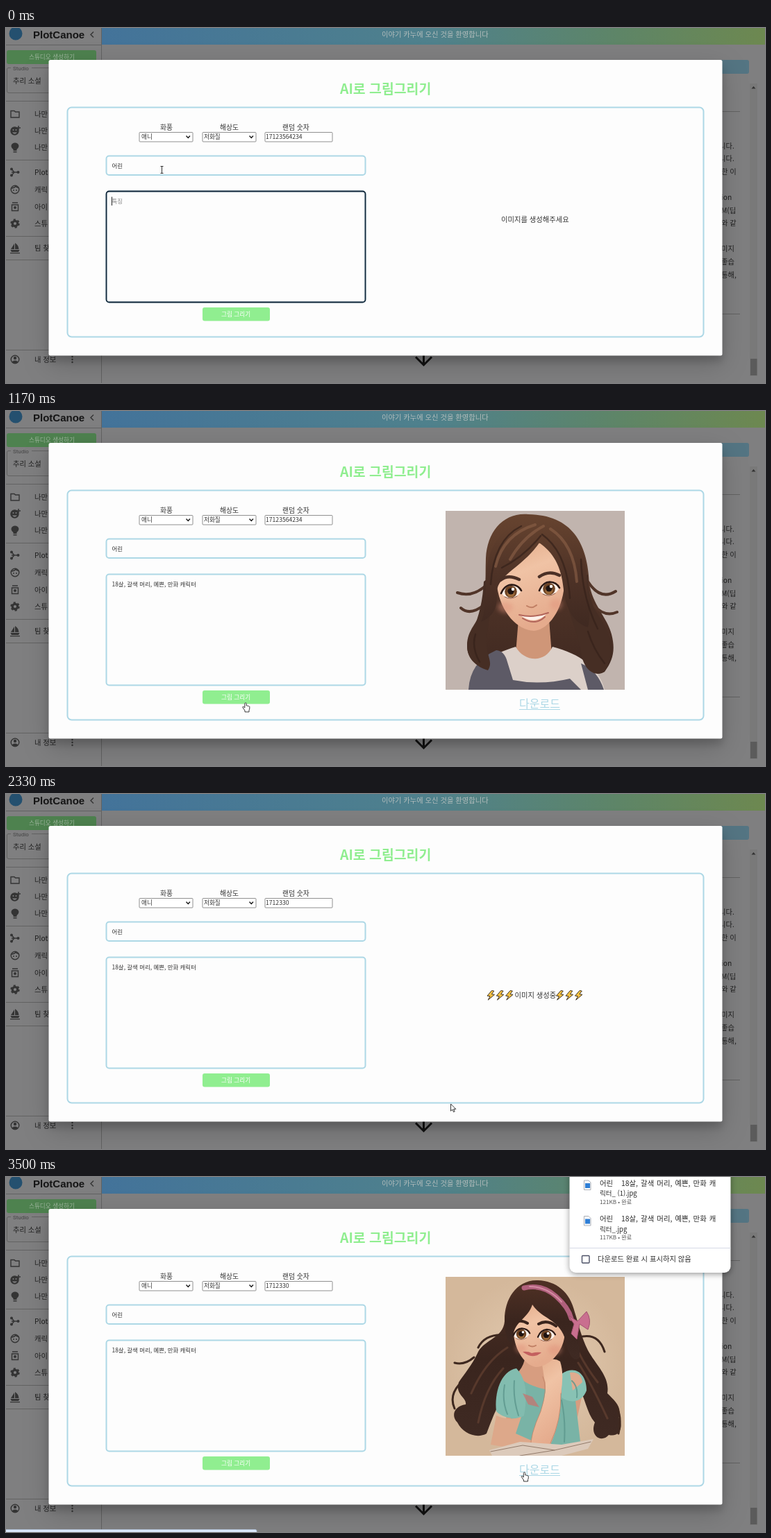
An HTML page that plays this animation: 1093 by 512 pixels, repeating every 3670 ms.

```html
<!DOCTYPE html>
<html lang="ko">
<head>
<meta charset="utf-8">
<title>AI로 그림그리기</title>
<style>
html, body { margin: 0; width: 100%; height: 100%; overflow: hidden; background: #7f7f80; }
#stage { display: block; width: 1093px; height: 512px; }
text { font: 10.3px "Noto Sans CJK KR", "Noto Sans CJK JP", sans-serif; fill: #333; white-space: pre; }
.s text, text.s { font-size: 8.65px; }
.s .typed { font-size: 8.45px; }
.dim text { fill: #202020; }
.line { fill: none; stroke: #626262; }
.blue { fill: #fdfdfd; stroke: #add8e6; stroke-width: 2; }
.field { fill: #fff; stroke: #858585; stroke-width: .9; }
.i { fill: #343434; }
.o { fill: none; stroke: #343434; stroke-width: 1.4; }
.modal { fill: #fdfdfd; filter: drop-shadow(0 8px 6px rgba(0,0,0,.16)) drop-shadow(0 12px 18px rgba(0,0,0,.18)); }
.popup { fill: #fff; filter: drop-shadow(0 2px 4px rgba(0,0,0,.4)); }
.pop text { fill: #2b2b2b; }
.pop .end { font-size: 9.5px; }
.pop .meta { font-size: 8.1px; fill: #555; }
.pop .name { font-size: 10.4px; word-spacing: 1.2px; }
.strand, .lid { fill: none; stroke-linecap: round; }
.soft { filter: blur(3px); }
[data-on] { visibility: hidden; }
</style>
</head>
<body>
<svg id="stage" viewBox="0 0 1093 512">
<defs>
  <linearGradient id="bar">
    <stop offset="0" stop-color="#43739a"/><stop offset=".5" stop-color="#4f818c"/>
    <stop offset=".78" stop-color="#5e8567"/><stop offset="1" stop-color="#6d8850"/>
  </linearGradient>
  <linearGradient id="hairA" x2="0" y2="1">
    <stop offset="0" stop-color="#66432f"/><stop offset=".5" stop-color="#4f3327"/><stop offset="1" stop-color="#3f2921"/>
  </linearGradient>
  <linearGradient id="hairB" x2="0" y2="1">
    <stop offset="0" stop-color="#4e3024"/><stop offset=".5" stop-color="#3a251e"/><stop offset="1" stop-color="#3f2a23"/>
  </linearGradient>
  <linearGradient id="skin" x2=".3" y2="1">
    <stop offset="0" stop-color="#e2a987"/><stop offset=".4" stop-color="#f0c3a5"/><stop offset="1" stop-color="#e5ab8d"/>
  </linearGradient>
  <radialGradient id="wallB">
    <stop offset="0" stop-color="#e4ccb2"/><stop offset="1" stop-color="#d4b89b"/>
  </radialGradient>
  <path id="bolt" d="M7.5 0 1 7.6 5 8.2 2.2 13.6 11.5 5.8 7.3 5.2 10.8.6Z" fill="#fdc443" stroke="#3b3226"/>
  <path id="arrow" d="M0 0V10.2L2.4 8 4 11.6 5.6 10.9 4.1 7.4H7.3Z" fill="#fff" stroke="#222" stroke-width=".9"/>
  <path id="hand" d="M2 0C.9 0 .8.8.8 1.5V7L-.9 5.6C-2 5-2.7 6-2 6.8L1 11V13H7V10.6C8 8.8 7.8 7 7.8 5.6 7.6 4.6 6.6 4.7 6.3 5 6 4 5 4 4.7 4.4 4.4 3.7 3.5 3.7 3.2 4V1.3C3.2.5 2.9 0 2 0Z" fill="#fff" stroke="#222" stroke-width=".9"/>
  <path id="beam" d="M-2 0H2M-2 10H2M0 0V10" stroke="#333" fill="none"/>
  <g id="eye">
    <path fill="#fbf1ea" d="M-13 2Q-9-10 1-10 11-9 14 0 8 9-1 9-9 9-13 2Z"/>
    <circle cy="-.5" r="8.8" fill="#6d4324"/><circle cy="2" r="5.5" fill="#9b6a3a"/>
    <circle cy="-1" r="4.6" fill="#1d1210"/><circle cx="3" cy="-4" r="2.200" fill="#fff"/>
    <path class="lid" stroke="#2c1a16" stroke-width="2.600" d="M-14 2Q-9-10 1-10.500 11-10 15-2"/>
    <path class="lid" stroke="#8a5644" d="M-9 7Q0 12 9 6"/>
  </g>
</defs>

<rect width="1093" height="512" fill="#7f7f80"/>
<g class="dim">
  <rect x="137" width="956" height="24" fill="url(#bar)"/>
  <text x="541" y="13" style="fill:#b3bdbc">이야기 카누에 오신 것을 환영합니다</text>
  <path class="line" d="M0 24.5H137M137.5 0V512"/>
  <circle cx="14" cy="8" r="9.5" fill="#24506f"/>
  <text x="39" y="14.5" style="font:bold 15px 'Liberation Sans',sans-serif;fill:#151515">PlotCanoe</text>
  <path class="o" d="M126 5.5 122 9.5 126 13.5"/>

  <rect x="1" y="32" width="129" height="20" rx="3" fill="#4e824f"/>
  <text class="s" x="33" y="45" style="fill:#9db59d">스튜디오 생성하기</text>
  <path class="line" d="M7 57.5H3Q1.5 57.5 1.5 60V91Q1.5 93.5 4 93.5H62M37 57.5H62"/>
  <text x="10" y="60.5" style="font:8px Roboto,sans-serif;fill:#444">Studio</text>
  <text x="10" y="79.5">추리 소설</text>
  <path class="line" d="M0 105.5H62M0 190.5H62M0 300.5H62M0 334.5H62M0 464.5H62"/>

  <path class="o" d="M7 119.5H12L13.5 121H19V129H7Z"/>
  <circle class="i" cx="12.5" cy="148.5" r="6.2"/><path d="M9 150.5Q12.5 155 16 150.5Z" fill="#7f7f80"/><circle cx="10.5" cy="147" r="1" fill="#7f7f80"/><circle cx="14.5" cy="147" r="1" fill="#7f7f80"/><path d="M18 141V147M15 144H21" stroke="#343434" stroke-width="1.5"/>
  <path class="i" d="M10.5 177V175C5 171 8 165.5 13 165.5S21 171 15.5 175V177ZM10.5 178H15.5V179.5H10.5Z"/>
  <path class="o" d="M8 203.5 12 208 8 212.5M8 208H17"/>
  <g class="i"><circle cx="8" cy="203.5" r="2"/><circle cx="8" cy="212.5" r="2"/><circle cx="17.5" cy="208" r="2"/></g>
  <circle class="o" cx="13" cy="233" r="5.8"/><path class="o" d="M7.5 231Q12 231 14 228 15 230 18.5 230.5"/><circle class="i" cx="11" cy="234" r="1"/><circle class="i" cx="15" cy="234" r="1"/>
  <path class="o" d="M9 252H17M8.5 255H17.5V263.5H8.5Z"/><circle class="i" cx="13" cy="259" r="2"/>
  <circle cx="13" cy="282" r="3.7" fill="none" stroke="#343434" stroke-width="3.2"/><circle cx="13" cy="282" r="5.7" fill="none" stroke="#343434" stroke-width="2" stroke-dasharray="3 2.97"/>
  <path class="i" d="M12 311V319H7ZM13 310Q18 313 18.5 319H13ZM6.5 320H19.5L18 323H8ZM6 324H20V325.3H6Z"/>
  <circle class="o" cx="13" cy="478" r="5.8"/><circle class="i" cx="13" cy="476" r="2.2"/><path class="i" d="M8.5 481.5Q13 477.5 17.5 481.5 13 486 8.5 481.5Z"/>
  <g id="menu"></g>
  <text x="41" y="482">내 정보</text>
  <g class="i"><circle cx="95.5" cy="474" r="1.2"/><circle cx="95.5" cy="478" r="1.2"/><circle cx="95.5" cy="482" r="1.2"/></g>

  <rect x="872" y="46" width="198" height="20" rx="3" fill="#547583"/>
  <path class="line" d="M1031 120.5H1057M1031 412.5H1057"/>
  <g id="prose"></g>
  <rect x="1071" y="80" width="11" height="422" fill="#797979"/>
  <rect x="1072" y="477" width="9.5" height="24" fill="#5b5b5b"/>
  <path d="M1073.5 87.5 1076.5 84 1079.5 87.5Z" fill="#333"/>
  <path d="M601.5 470V485M590 474.5 601.5 486 613 474.5" fill="none" stroke="#111" stroke-width="3"/>
</g>

<rect class="modal" x="61.5" y="46" width="970" height="426.5" rx="2.5"/>
<text x="481" y="95" style="font-size:19.4px;font-weight:700;fill:#90ee90">AI로 그림그리기</text>
<rect class="blue" x="88.5" y="114.5" width="916" height="331" rx="6"/>
<text x="222" y="146.5" style="font-size:9.8px">화풍</text>
<text x="308" y="146.5" style="font-size:9.8px">해상도</text>
<text x="398" y="146.5" style="font-size:9.8px">랜덤 숫자</text>

<g class="s">
  <rect class="field" x="192" y="150.5" width="77" height="13.5" rx="1"/>
  <rect class="field" x="283" y="150.5" width="77" height="13.5" rx="1"/>
  <rect class="field" x="373" y="150.5" width="97" height="13.5" rx="1"/>
  <path d="M259.5 155.5 262.3 158.5 265 155.5M350.5 155.5 353.3 158.5 356 155.5" fill="none" stroke="#222" stroke-width="1.5"/>
  <text x="195" y="160">애니</text>
  <text x="285" y="160">저화질</text>
  <text x="374" y="160" data-on="0-1830">17123564234</text>
  <g data-on="1830-2000">
    <rect x="373" y="150.5" width="97" height="13.5" rx="1.5" fill="none" stroke="#222" stroke-width="2"/>
    <path d="M408.5 152V162" stroke="#222"/>
  </g>
  <text x="374" y="160" data-on="1830-3670">1712330</text>

  <rect class="blue" x="144.5" y="184.5" width="373" height="27.5" rx="4"/>
  <text class="typed" x="152.5" y="201.5">어린</text>
  <rect class="blue" x="144.5" y="235.5" width="373" height="160" rx="4"/>
  <rect x="144.5" y="235.5" width="373" height="160" rx="4" fill="none" stroke="#16283a" stroke-width="1.8" data-on="0-830"/>
  <g id="typing"></g>
  <rect x="283" y="403" width="97" height="19.5" rx="3" fill="#90ee90"/>
  <text x="310" y="416" style="fill:#fff">그림 그리기</text>
</g>

<text x="713" y="280" data-on="0-1000">이미지를 생성해주세요</text>
<g data-on="1000-1170 2000-3000">
  <g id="bolts"></g>
  <text x="732.5" y="293.5">이미지 생성중</text>
</g>

<svg x="633" y="144" width="258" height="258" viewBox="633 144 258 258" data-on="1170-2000">
  <rect x="633" y="144" width="258" height="258" fill="#c1b4ae"/>
  <path fill="url(#hairA)" d="M752 149C716 146 693 174 691 212 690 240 692 262 686 285 680 305 664 315 664 338 664 356 676 368 694 372L720 350H800C815 372 840 386 862 376 874 360 878 345 872 322 866 298 846 282 840 250 838 200 822 150 752 149Z"/>
  <path class="strand" stroke="#513529" stroke-width="4" d="M693 250Q672 270 650 262M688 280Q668 296 655 284M838 246Q856 274 878 260M846 280Q862 298 880 290"/>
  <path fill="#cf9678" d="M738 300H782L786 352Q760 372 734 350Z"/>
  <path fill="#dcd0c9" d="M668 402C672 368 700 350 734 340 746 362 776 364 787 340 826 350 854 370 862 402Z"/>
  <path fill="#5d5a66" d="M666 402Q668 362 706 345 718 346 722 362L730 388Q770 396 812 386L828 402ZM828 364Q852 374 861 402H838Z"/>
  <path fill="url(#skin)" d="M706 240C705 205 730 190 760 190 794 190 806 215 804 248 803 284 782 316 760 317 734 316 707 285 706 240Z"/>
  <g class="soft" fill="#e0917a" opacity=".45"><ellipse cx="719" cy="283" rx="11" ry="8"/><ellipse cx="792" cy="279" rx="9" ry="8"/></g>
  <path fill="#462e24" d="M696 240C702 290 692 312 692 334 692 354 702 362 694 374 668 366 658 345 668 326 680 300 686 280 688 246ZM804 250C810 300 824 318 828 348 832 376 850 384 862 376 878 348 870 318 850 290 840 272 838 255 838 236Z"/>
  <path fill="url(#hairA)" d="M774 154C735 150 690 178 691 250 691 274 690 290 684 304 704 296 708 282 707 258 712 234 745 224 768 190 788 204 800 224 803 258 806 285 818 306 838 312 844 290 836 262 836 238 836 196 815 158 774 154Z"/>
  <path class="strand" stroke="#8d6148" stroke-width="4" opacity=".6" d="M762 164Q716 178 705 224M774 166Q744 182 726 214M784 170Q818 192 822 246"/>
  <path class="strand" stroke="#36221b" stroke-width="2.500" opacity=".7" d="M742 166Q702 186 698 250M770 180Q746 210 714 226M772 178Q808 204 812 270M828 214Q830 270 852 314M676 322Q670 340 682 362M838 318Q846 344 862 364"/>
  <use href="#eye" x="727" y="261"/><use href="#eye" x="782" y="257"/>
  <path class="lid" stroke="#4b3026" stroke-width="4.500" d="M712 244Q723 235 739 243M768 239Q782 229 797 237"/>
  <path class="lid" stroke="#c07f64" stroke-width="2" d="M750 281Q757 286 764 280"/>
  <path fill="#fff1ea" d="M741 295Q760 299 779 292 762 310 741 295Z"/>
  <path class="lid" stroke="#b2665b" stroke-width="2" d="M739 294Q760 299 781 291M744 299Q762 310 776 297"/>
</svg>

<svg x="633" y="144" width="258" height="258" viewBox="633 144 258 258" data-on="3000-3670">
  <rect x="633" y="144" width="258" height="258" fill="url(#wallB)"/>
  <path fill="url(#hairB)" d="M766 149C734 148 717 178 718 208 716 232 690 234 680 252 672 270 660 284 652 296 646 314 664 318 662 328 646 330 640 344 650 354 658 370 678 378 692 370 702 345 706 330 724 306L822 296C834 318 836 340 848 354 840 374 858 384 868 372 884 376 890 360 882 346 888 332 876 322 866 312 870 288 850 272 838 250 828 230 824 210 819 195 812 165 792 150 766 149Z"/>
  <path class="strand" stroke="#3e281f" stroke-width="3" d="M718 228Q690 226 680 246M674 260Q660 272 646 268M652 300Q638 316 646 334M830 230Q854 226 862 252M868 318Q890 336 882 370"/>
  <path class="strand" stroke="#6a4534" stroke-width="3" opacity=".6" d="M722 246Q690 266 670 312M716 276Q690 304 680 354M816 232Q826 262 852 296M824 268Q842 296 866 348M748 166Q730 180 726 216M786 170Q808 186 814 226"/>
  <path fill="#d79d80" d="M748 258H786L790 284Q815 286 832 304L820 360H720L722 290Q744 284 748 258Z"/>
  <path fill="#79b3a6" d="M732 280Q745 303 790 308L820 322 828 390H724Z"/>
  <path fill="#82bcaf" d="M735 276C712 280 703 312 706 338 718 350 738 350 746 344 752 310 748 290 735 276Z"/>
  <path fill="#88c2b4" d="M800 284C820 270 836 284 836 308 830 324 814 328 800 318Z"/>
  <path fill="#e0ab8e" d="M812 282Q828 280 830 296L816 308Z"/>
  <path fill="#cb716c" d="M744 312 758 317 768 332 752 328Z" opacity=".7"/>
  <path class="strand" stroke="#5c968d" stroke-width="2" opacity=".8" d="M718 300Q714 322 722 342M732 294Q730 320 738 344M800 322Q806 350 804 382M815 294Q824 302 822 318"/>
  <path fill="#dda88a" d="M706 344Q724 352 742 346L734 370 770 386 756 396 698 386Z"/>
  <path fill="url(#skin)" d="M772 270Q786 258 798 266 804 284 799 312 800 350 784 386 770 396 756 390 754 374 770 338 781 304 775 290Z"/>
  <path class="strand" stroke="#b97d62" opacity=".7" d="M773 288Q781 304 770 338 754 374 756 390M799 312Q800 350 784 384"/>
  <path fill="url(#skin)" d="M731 212C732 188 748 176 770 180 798 184 810 205 804 232 800 256 780 274 763 274 744 271 728 242 731 212Z"/>
  <g class="soft" fill="#e0917a" opacity=".5"><ellipse cx="742" cy="247" rx="8" ry="6"/><ellipse cx="790" cy="249" rx="10" ry="7"/></g>
  <path fill="url(#hairB)" d="M768 154C735 152 716 182 719 222 722 238 728 246 730 230 732 208 752 204 758 184 772 206 797 204 806 236 810 260 820 268 826 260 828 210 814 164 768 154Z"/>
  <path class="strand" stroke="#b0607c" stroke-width="7" d="M746 160Q772 154 792 172 810 188 814 204"/>
  <path class="strand" stroke="#d58ca3" stroke-width="2" d="M754 158Q780 158 800 180"/>
  <path fill="#c96f8f" stroke="#a2506f" d="M823 208 836 194Q844 206 838 220L826 212 822 234 814 226 818 212 810 200Z"/>
  <use href="#eye" transform="translate(742 227) scale(.82)"/><use href="#eye" transform="translate(778 229) scale(.86)"/>
  <path class="lid" stroke="#3a241d" stroke-width="4" d="M731 212Q740 204 751 211M767 212Q779 205 792 215"/>
  <path class="lid" stroke="#c07f64" stroke-width="2" d="M753 243Q758 246 763 243"/>
  <path fill="#c4605f" d="M744 252Q752 251 757 254 764 252 771 253 759 264 744 252Z"/>
  <path fill="#dccabb" d="M696 394 740 382 800 386 846 378 838 392 800 402H700Z"/>
  <path class="strand" stroke="#927a6a" d="M698 396 744 387 790 394 842 382M740 402 790 394"/>
</svg>

<g data-on="1170-2000 3000-3670">
  <text x="739" y="428" style="font-size:16px;fill:#add8e6">다운로드</text>
  <path d="M739 430.5H798" stroke="#add8e6" stroke-width="1.2"/>
</g>

<rect x="-3" y="508.5" width="364" height="8" rx="2" fill="#dbe8fb" stroke="#aebfd6" stroke-width=".8" data-on="3330-3670"/>
<g class="pop" data-on="3500-3670">
  <rect class="popup" x="811.5" y="-20" width="232" height="158" rx="9"/>
  <g id="files"></g>
  <path d="M811.5 102.5H1043.5" stroke="#d5d9e6"/>
  <rect x="829.5" y="113.5" width="10.5" height="10.5" rx="1" fill="#fff" stroke="#4b5066" stroke-width="1.4"/>
  <text x="852" y="122">다운로드 완료 시 표시하지 않음</text>
</g>

<g id="pointer"></g>
</svg>

<script>
const LOOP = 3670;
const $ = id => document.getElementById(id);
const fill = (id, rows, draw) => { $(id).innerHTML = rows.map(draw).join(''); };

fill('menu', [[127.5, '나만'], [152, '나만'], [176, '나만'], [212, 'Plot'], [237, '캐릭'],
  [261.5, '아이'], [285.5, '스튜'], [321, '팀 찾']],
  ([y, s]) => `<text x="41" y="${y}">${s}</text>`);

// Line endings that stick out to the right of the dialog
fill('prose', ['니다.', '니다.', '한 이', '', 'ion', 'M(딥', '와 같', '', '미지', '좋습', '통해,'],
  (s, i) => `<text x="${s === '니다.' ? 1027 : 1030}" y="${173.5 + i * 18.6}">${s}</text>`);

// from, to, text, caret x (0 = none)
fill('typing', [[0, 170, '특징', 152.5], [170, 330, '1', 158], [330, 500, '18', 163],
  [500, 670, '18살', 171], [670, 830, '18살,', 173.5], [830, LOOP, '18살, 갈색 머리, 예쁜, 만화 캐릭터', 0]],
  ([from, to, s, caret]) => `<g data-on="${from}-${to}">
    <text class="typed" x="152.5" y="253" ${from ? '' : 'style="fill:#8a8a8a"'}>${s}</text>
    ${caret ? `<path d="M${caret} 243.5V256" stroke="#222"/>` : ''}</g>`);

fill('bolts', [692, 705.3, 718.6, 791.5, 805, 818.5], x => `<use href="#bolt" x="${x}" y="283.5"/>`);

fill('files', [[0, '릭터_ (1).jpg', '121KB'], [51.5, '릭터_.jpg', '117KB']],
  ([y, end, size]) => `<g transform="translate(0 ${y})">
    <path d="M832.5 5H839L842 8V18.5H832.5Z" fill="#fff" stroke="#a9adb5"/>
    <rect x="834" y="9" width="7" height="7" fill="#2f7fd6"/>
    <text class="name" x="855" y="12.5">어린</text>
    <text class="name" x="886" y="12.5">18살, 갈색 머리, 예쁜, 만화 캐</text>
    <text class="end" x="855" y="27">${end}</text>
    <text class="meta" x="855" y="38.5">${size} • 완료</text></g>`);

fill('pointer', [[0, 830, 'beam', 224.5, 199.5], [830, 1670, 'hand', 343, 421], [1670, 1830, 'arrow', 448, 169],
  [1830, 2000, 'beam', 460, 160], [2000, 2830, 'arrow', 640.5, 447], [2830, 3170, 'arrow', 646, 445],
  [3170, LOOP, 'hand', 744.5, 426]],
  ([from, to, shape, x, y]) => `<use href="#${shape}" x="${x}" y="${y}" data-on="${from}-${to}"/>`);

const parts = [...document.querySelectorAll('[data-on]')].map(el => ({
  el, spans: el.dataset.on.split(' ').map(s => s.split('-').map(Number))
}));

function show() {
  const t = performance.now() % LOOP;
  for (const { el, spans } of parts)
    el.style.visibility = spans.some(([a, b]) => t >= a && t < b) ? 'visible' : 'hidden';
  requestAnimationFrame(show);
}
show();
</script>
</body>
</html>
```
